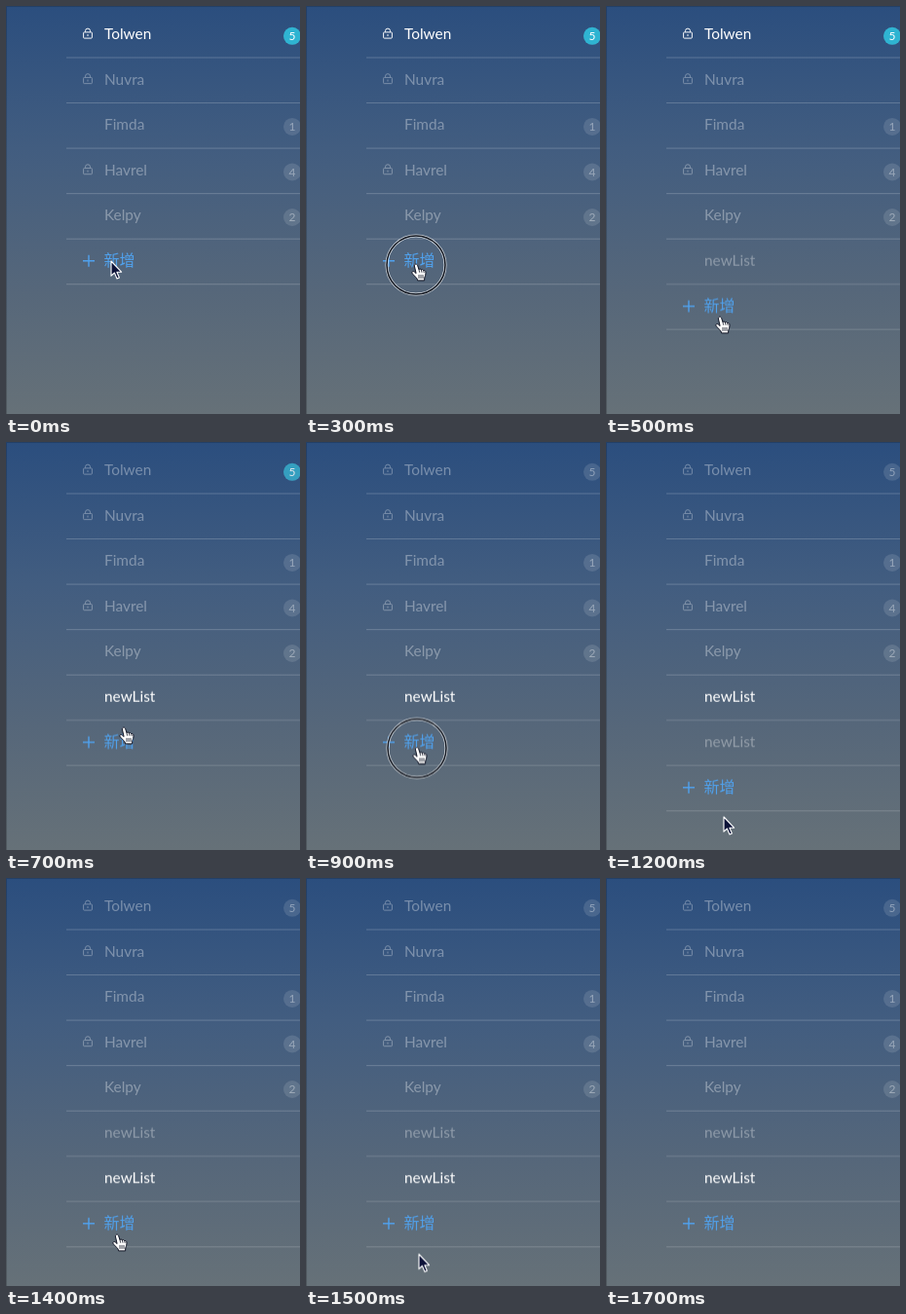
Animation, 302 px wide and 419 px high, one loop 1800 ms. Source, as an HTML page:

```html
<!DOCTYPE html>
<html lang="zh-Hant">
<head>
<meta charset="utf-8">
<title>List menu</title>
<style>
  html, body { margin: 0; width: 100%; height: 100%; overflow: hidden; background: #4b6081; }
  svg { display: block; width: 100vw; height: 100vh; }

  text { font: 15.4px Lato, "Open Sans", sans-serif; fill: #fff; }
  .count { font-size: 12px; text-anchor: middle; }
  .add text { font: 500 16px "Noto Sans CJK TC", "Noto Sans CJK", sans-serif; fill: #50a2ee; }
  .plus { stroke: #50a2ee; stroke-width: 1.4; }
  .rule { stroke: #fff; stroke-opacity: .2; }
  .icon { fill: none; stroke: #fff; stroke-width: .95; }
  .dim { opacity: .35; }
  .disc { fill: #fff; fill-opacity: .12; }
  .badge .count { opacity: .38; }

  /* every change lands on a 100 ms tick of the 1800 ms loop */
  .anim { animation: 1800ms step-end infinite; }
  .first { animation-name: deselect; }
  .glow { animation-name: glow; }
  .new1 { animation-name: show1; }
  .new1 text { animation-name: select1; }
  .new2 { animation-name: show2; }
  .new2 text { animation-name: select2; }
  .add { animation-name: shift; }
  .cursor { animation-name: travel; animation-timing-function: linear; }
  .ring { animation-name: press; }
  .hand, .arrow { animation-name: hover; }
  .hand { --over: 1; --out: 0; }
  .arrow { --over: 0; --out: 1; }

  @keyframes deselect { 0% { opacity: 1 } 33.33%, 100% { opacity: .35 } }
  @keyframes glow {
    0% { opacity: 1 } 33.33% { opacity: .94 } 38.88% { opacity: .74 }
    44.44% { opacity: .35 } 49.99%, 100% { opacity: 0 }
  }
  @keyframes show1 { 0% { opacity: 0 } 27.77%, 100% { opacity: 1 } }
  @keyframes show2 { 0% { opacity: 0 } 61.11%, 100% { opacity: 1 } }
  @keyframes select1 { 0% { opacity: .35 } 33.33% { opacity: 1 } 72.22%, 100% { opacity: .35 } }
  @keyframes select2 { 0% { opacity: .35 } 72.22%, 100% { opacity: 1 } }
  @keyframes shift {
    0% { transform: translateY(232.75px) }
    27.77% { transform: translateY(279.3px) }
    61.11%, 100% { transform: translateY(325.85px) }
  }
  @keyframes travel {
    0% { transform: translate(108px, 262px); animation-timing-function: steps(3) }
    16.66% { transform: translate(113px, 266px); animation-timing-function: step-end }
    27.77% { transform: translate(117px, 320px); animation-timing-function: step-end }
    33.33% { transform: translate(120px, 357px); animation-timing-function: step-end }
    38.88% { transform: translate(121px, 294px); animation-timing-function: steps(2) }
    49.99% { transform: translate(114px, 314.5px); animation-timing-function: step-end }
    61.11% { transform: translate(117px, 350px); animation-timing-function: step-end }
    66.66% { transform: translate(121px, 385px); animation-timing-function: steps(2) }
    77.77% { transform: translate(114px, 367px); animation-timing-function: steps(3) }
    94.44%, 100% { transform: translate(120px, 425px) }
  }
  @keyframes press {
    0% { opacity: 0 } 16.66% { opacity: 1 } 27.77% { opacity: 0 }
    49.99% { opacity: 1 } 61.11%, 100% { opacity: 0 }
  }
  @keyframes hover {
    0% { opacity: var(--out) } 5.55% { opacity: var(--over) }
    33.33% { opacity: var(--out) } 38.88% { opacity: var(--over) }
    66.66% { opacity: var(--out) } 72.22% { opacity: var(--over) }
    83.33%, 100% { opacity: var(--out) }
  }
</style>
</head>
<body>
<svg viewBox="0 0 302 419" preserveAspectRatio="none">
  <defs>
    <linearGradient id="sky" x2="0" y2="1">
      <stop offset="0" stop-color="#2b4e7e"/>
      <stop offset=".35" stop-color="#425d80"/>
      <stop offset=".7" stop-color="#56677a"/>
      <stop offset="1" stop-color="#667178"/>
    </linearGradient>
    <path id="rule" class="rule" d="M62 53H302"/>
    <g id="lock" class="icon">
      <rect x="79.6" y="26.9" width="8.8" height="6.2" rx=".8"/>
      <path d="M81.5 26.8V25.6a2.5 2.5 0 0 1 5 0V26.8M84 29V31"/>
    </g>
    <circle id="disc" cx="294" cy="30.8" r="9"/>
  </defs>

  <rect width="302" height="419" fill="url(#sky)"/>
  <path d="M.5 419V.5H302" fill="none" stroke="#000" stroke-opacity=".18"/>

  <g>
    <use href="#rule"/>
    <g class="anim first"><use href="#lock"/><text x="101" y="34.3">Tolwen</text></g>
    <g class="badge"><use href="#disc" class="disc"/><text class="count" x="294" y="35.2">5</text></g>
    <g class="anim glow"><use href="#disc" fill="#2fb4d2"/><text class="count" x="294" y="35.2">5</text></g>
  </g>
  <g transform="translate(0 46.55)">
    <use href="#rule"/>
    <g class="dim"><use href="#lock"/><text x="101" y="34.3">Nuvra</text></g>
  </g>
  <g transform="translate(0 93.1)">
    <use href="#rule"/>
    <text class="dim" x="101" y="34.3">Fimda</text>
    <g class="badge"><use href="#disc" class="disc"/><text class="count" x="294" y="35.2">1</text></g>
  </g>
  <g transform="translate(0 139.65)">
    <use href="#rule"/>
    <g class="dim"><use href="#lock"/><text x="101" y="34.3">Havrel</text></g>
    <g class="badge"><use href="#disc" class="disc"/><text class="count" x="294" y="35.2">4</text></g>
  </g>
  <g transform="translate(0 186.2)">
    <use href="#rule"/>
    <text class="dim" x="101" y="34.3">Kelpy</text>
    <g class="badge"><use href="#disc" class="disc"/><text class="count" x="294" y="35.2">2</text></g>
  </g>
  <g transform="translate(0 232.75)">
    <g class="anim new1"><use href="#rule"/><text class="anim" x="101" y="34.3">newList</text></g>
  </g>
  <g transform="translate(0 279.3)">
    <g class="anim new2"><use href="#rule"/><text class="anim" x="101" y="34.3">newList</text></g>
  </g>

  <g class="anim add">
    <use href="#rule"/>
    <path class="plus" d="M79 29H91M85 23V35"/>
    <text x="100.6" y="34.6">新增</text>
  </g>

  <g class="anim cursor">
    <g class="anim ring" fill="none">
      <circle r="30" stroke="#fff" stroke-opacity=".75" stroke-width="3"/>
      <circle r="30" stroke="#10151f" stroke-width="1.5"/>
    </g>
    <path class="anim arrow" fill="#0c1238" stroke="#fff" stroke-width="1.1" stroke-linejoin="round"
      d="M0 0V15.2L3.4 12L6 18L8.4 17L5.9 11.2H10.6Z"/>
    <g class="anim hand" stroke="#0c1020" stroke-linejoin="round" stroke-linecap="round">
      <path fill="#fff" d="M-1.6 .7C-1.6-1.3 1-1.4 1.6 .4L3 4.7C3.6 3.7 5 3.9 5.4 5C6.2 4.3 7.4 4.6 7.8 5.6C8.8 5.2 9.8 5.9 9.9 7.1C10.2 9.6 9.4 11.3 8.8 12.9L8.6 15.9H1.6L1 13.9C-.6 11.9-3 9.9-4 8.3C-4.6 6.9-3 5.9-1.6 7.1L-.2 8.3Z"/>
      <path fill="none" stroke-width=".8" d="M3 4.7L3.6 7.3M5.4 5L5.9 7.3M7.8 5.6L8.1 7.5M3 10.3V13.5M5 10.3V13.5M7 10.3V13.5"/>
    </g>
  </g>
</svg>
</body>
</html>
```
